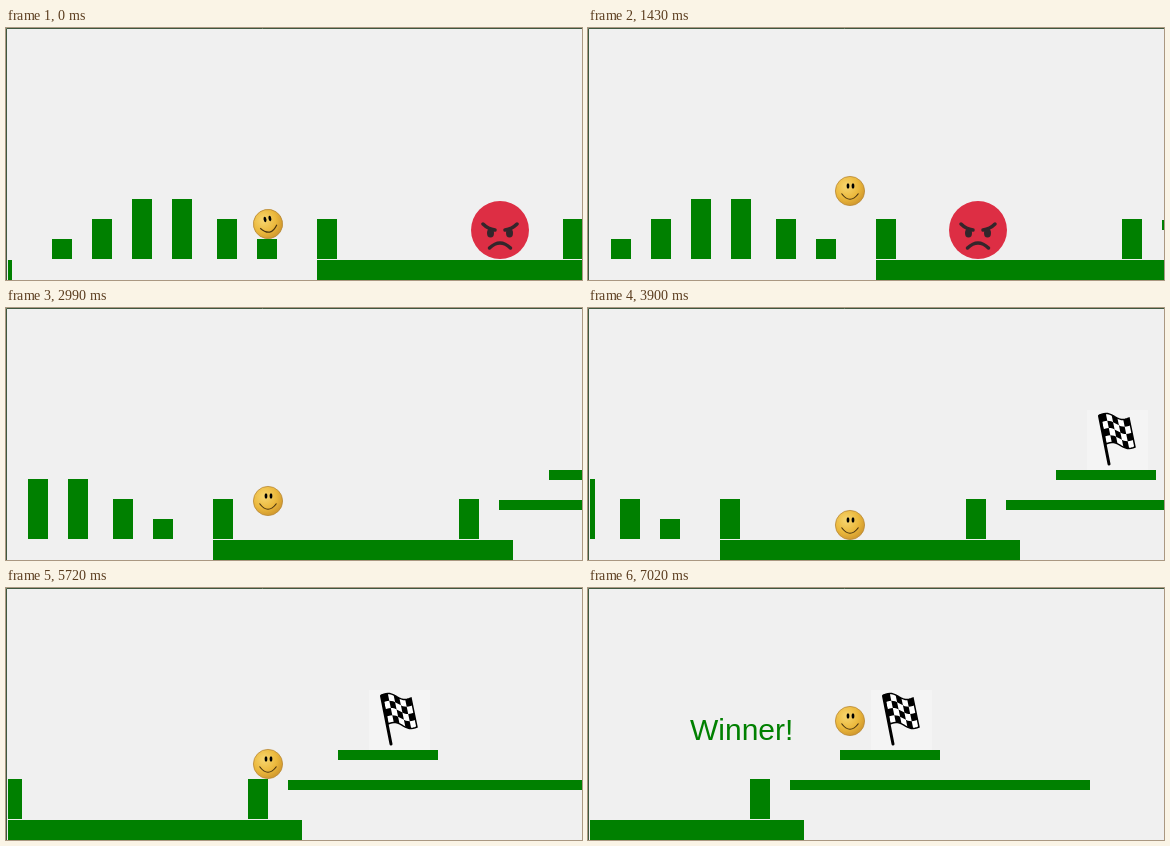
These frames come from a looping animation (576x252 px, 9.1 s). An HTML page:

```html
<!DOCTYPE html>
<html lang="en">
<head>
<meta charset="utf-8">
<title>Platform game</title>
<style>
  html, body { margin: 0; width: 100%; height: 100%; overflow: hidden; background: #f0f0f0; }
  svg { display: block; width: 100%; height: 100%; }
  text { font: 30px "Liberation Sans", Arial, sans-serif; }
</style>
</head>
<body>
<svg viewBox="0 0 576 252">
  <defs>
    <radialGradient id="gold" cx=".38" cy=".34" r=".7">
      <stop offset="0" stop-color="#f7d670"/>
      <stop offset=".6" stop-color="#ebb83c"/>
      <stop offset="1" stop-color="#cf962c"/>
    </radialGradient>
    <clipPath id="view"><rect x="2" y="1" width="574" height="251"/></clipPath>
  </defs>
  <rect width="576" height="252" fill="#f0f0f0"/>
  <g clip-path="url(#view)">
    <g id="world">
      <g id="blocks" fill="#008000"></g>
      <g transform="translate(678 102)">
        <rect width="61" height="60" fill="#f4f4f4"/>
        <path id="cloth" fill="#fff" stroke="#000" stroke-width="1.5"/>
        <path id="checks"/>
        <path d="M12.5 6 L22 54" stroke="#000" stroke-width="3" stroke-linecap="round"/>
      </g>
      <g id="enemy" fill="none" stroke="#33262b" stroke-linecap="round">
        <circle r="29" fill="#dd2e44" stroke="none"/>
        <path d="M-17 -6 Q-12 -1 -5 0 M17 -6 Q12 -1 5 0" stroke-width="3.5"/>
        <ellipse cx="-9.5" cy="3" rx="3.5" ry="4.5" fill="#33262b" stroke="none"/>
        <ellipse cx="9.5" cy="3" rx="3.5" ry="4.5" fill="#33262b" stroke="none"/>
        <path d="M-10.5 18 Q0 8 10.5 18" stroke-width="3.5"/>
      </g>
    </g>
    <g id="player">
      <circle r="14.6" fill="url(#gold)" stroke="#b98a38" stroke-width=".8"/>
      <ellipse cx="-2" cy="-5" rx="1.4" ry="2.8"/>
      <ellipse cx="3" cy="-5" rx="1.4" ry="2.8"/>
      <path d="M-8.5 2.5 Q0 14 8.5 2.5" fill="none" stroke="#4a3410" stroke-width="1.2"/>
    </g>
    <text id="message" x="102" y="152" fill="#008000">Winner!</text>
  </g>
  <path d="M.5 252 V.5 H576" fill="none" stroke="#3f583f"/>
</svg>
<script>
const LOOP = 9100, STEP = 130, WIN = 7020;
const STOMP = 2990, TURN = 2370, ENEMY_SPEED = 0.0565;
const el = id => document.getElementById(id);

// x, y, width, height in level coordinates
const pillars = [[46, 211], [86, 191], [126, 171], [166, 171], [211, 191], [251, 211], [311, 191], [557, 191]];
const blocks = [
  ...pillars.map(([x, y]) => [x, y, 20, 231 - y]),
  [-294, 232, 300, 20], [311, 232, 300, 20], [597, 192, 300, 10], [647, 162, 100, 10]
];
el('blocks').innerHTML = blocks.map(([x, y, w, h]) =>
  `<rect x="${x}" y="${y}" width="${w}" height="${h}"/>`).join('');

const clothPoint = (u, v) =>
  [13 + 29 * u + 6 * v, 5 + 3 * u + 29 * v - 2.2 * Math.sin(2 * Math.PI * u)].map(n => n.toFixed(1)).join(' ');

function patch(u0, v0, u1, v1, parts) {
  const points = [];
  for (let i = 0; i <= parts; i++) points.push(clothPoint(u0 + (u1 - u0) * i / parts, v0));
  for (let i = parts; i >= 0; i--) points.push(clothPoint(u0 + (u1 - u0) * i / parts, v1));
  return `M${points.join('L')}Z`;
}

let checks = '';
for (let row = 0; row < 4; row++)
  for (let col = row % 2; col < 5; col += 2)
    checks += patch(col / 5, row / 4, (col + 1) / 5, (row + 1) / 4, 3);
el('cloth').setAttribute('d', patch(0, 0, 1, 1, 15));
el('checks').setAttribute('d', checks);

// time, camera offset
const scrollKeys = [
  [0, 0], [1170, 0], [1870, 61], [2470, 61], [2990, 104], [3900, 179], [5200, 280],
  [5330, 280], [5720, 315], [6370, 367], [6500, 373], [6760, 373], [WIN, 395]
];

function scrollAt(t) {
  const next = scrollKeys.findIndex(key => key[0] > t);
  if (next < 0) return scrollKeys[scrollKeys.length - 1][1];
  const [t0, s0] = scrollKeys[next - 1], [t1, s1] = scrollKeys[next];
  return s0 + (s1 - s0) * (t - t0) / (t1 - t0);
}

// start time, take-off height (Infinity = no jump), resting height
const moves = [
  [0, Infinity, 196], [1350, 196, 176], [2503, 176, 217], [5340, 217, 176],
  [5900, Infinity, 177], [6785, 177, 177], [WIN, Infinity, 133]
];

function playerY(t) {
  const [start, from, rest] = moves.filter(move => move[0] <= t).pop();
  const d = t - start;
  return Math.min(rest, from - 0.5 * d + 0.0011 * d * d);
}

const enemyX = t => 494 - ENEMY_SPEED * (TURN - Math.abs(TURN - t));
const show = (id, visible) => el(id).setAttribute('visibility', visible ? 'visible' : 'hidden');
const place = (id, x, y, turn = 0) =>
  el(id).setAttribute('transform', `translate(${Math.round(x)} ${Math.round(y)}) rotate(${turn})`);

function draw(now) {
  const t = Math.floor(now % LOOP / STEP) * STEP;
  place('world', -scrollAt(t), 0);
  place('player', 262, playerY(t), t < 1300 ? -12 : 0);
  place('enemy', enemyX(t), 202);
  show('enemy', t < STOMP);
  show('message', t >= WIN);
}

const begin = performance.now();
function tick() {
  draw(performance.now() - begin);
  requestAnimationFrame(tick);
}
tick();
</script>
</body>
</html>
```
